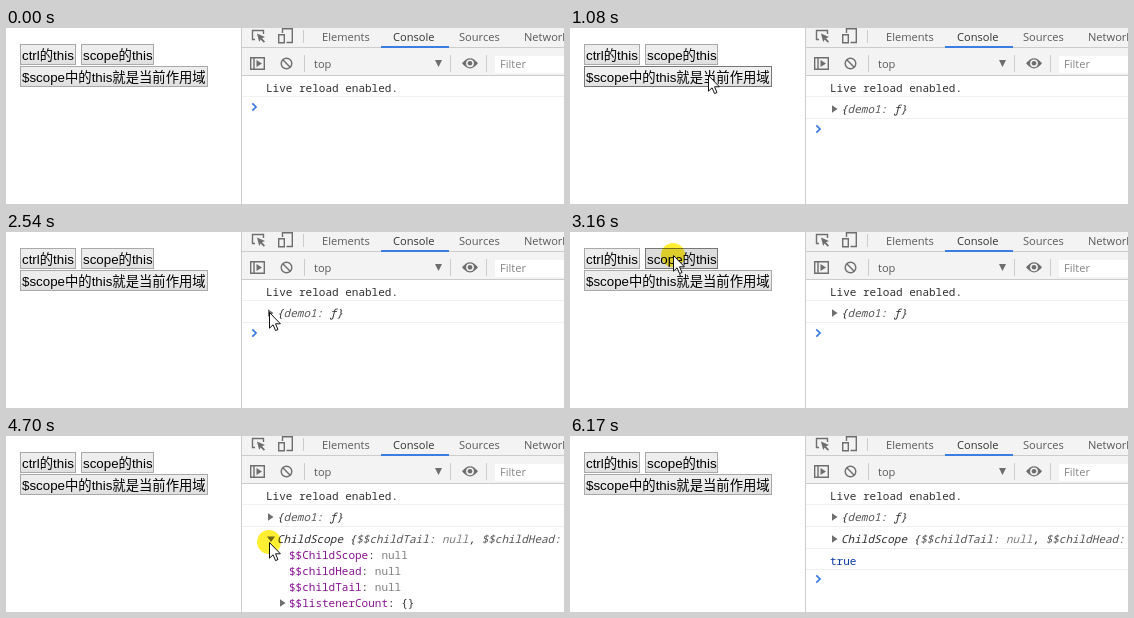
These frames come from a looping animation (558 px wide and 176 px high, 6.7 s). An HTML page:

```html
<!DOCTYPE html>
<html lang="zh">
<head>
<meta charset="utf-8">
<style>
html, body { margin: 0; width: 100%; height: 100%; overflow: hidden; background: #fff; }
svg { display: block; }
text { white-space: pre; }
.btn text { font: 13.333px "Liberation Sans", "Noto Sans CJK SC", "Noto Sans CJK", sans-serif; }
.btn rect { fill: url(#face); stroke: #a9a9a9; }
.btn.hover rect { fill: url(#faceHover); stroke: #777; }
.btn.down rect { fill: #dcdcdc; stroke: #777; }
.ui { font: 11.1px "Open Sans", sans-serif; fill: #5a5a5a; }
.log { font: 11px "Noto Sans Mono", monospace; fill: #303030; }
.pre { font-style: italic; }
.key { fill: #881391; }
.dim { fill: #565656; }
.nil { fill: #808080; }
.rule { stroke: #f0f0f0; }
.line { stroke: #ccc; }
.icon { fill: none; stroke: #6e6e6e; stroke-width: 1.4; }
.solid { fill: #6e6e6e; }
</style>
</head>
<body>
<svg width="558" height="176" viewBox="0 0 558 176">
  <defs>
    <linearGradient id="face" x2="0" y2="1"><stop offset=".38" stop-color="#ededed"/><stop offset="1" stop-color="#dedede"/></linearGradient>
    <linearGradient id="faceHover" x2="0" y2="1"><stop offset=".38" stop-color="#f0f0f0"/><stop offset="1" stop-color="#e0e0e0"/></linearGradient>
  </defs>
  <g id="buttons"></g>

  <rect x="235" width="323" height="47" fill="#f3f3f3"/>
  <path class="line" d="M235.5 0V176M236 19.5H558M236 47.5H558M297.5 2V15M298.5 27V44M444.5 27V44M480.5 27V44"/>
  <path d="M375 19H443" stroke="#3b7de0" stroke-width="2"/>
  <g class="ui">
    <text x="316" y="13">Elements</text>
    <text x="387" y="13" fill="#333">Console</text>
    <text x="453" y="13">Sources</text>
    <text x="518" y="13">Network</text>
    <text x="308" y="40">top</text>
  </g>
  <path class="icon" d="M249 11.5H246.5V2.5H257.5V6M276.5 5V.7H286.3V14.5H280.5M272.7 6.7H278.3V14.8H272.7Z"/>
  <path class="solid" d="M251 5.5L259 9L256 10.2L259 13.5L257.8 14.7L254.6 11.5L253.2 14ZM429 32H436L432.5 39Z"/>
  <path class="icon" d="M244.7 29.7H258.3V41.3H244.7ZM248 30V41"/>
  <path class="solid" d="M250.5 32L256 35.5L250.5 39Z"/>
  <circle class="icon" cx="280.5" cy="35.5" r="5.3"/>
  <path class="icon" d="M276.8 31.8L284.2 39.2"/>
  <path class="solid" d="M456 35.3Q464 25 472 35.3Q464 45.5 456 35.3Z"/>
  <circle cx="464" cy="35.3" r="3.9" fill="#f3f3f3"/>
  <circle class="solid" cx="464" cy="35.3" r="2.3"/>
  <rect x="489" y="28" width="69" height="17" fill="#fff"/>
  <text class="ui" x="494" y="40" style="fill:#858585">Filter</text>

  <g class="log">
    <text x="260" y="64">Live reload enabled.</text>
    <path class="rule" d="M236 68.5H558"/>
    <g id="demo">
      <path id="demoMark" class="solid"/>
      <text class="pre" x="271" y="85">{<tspan class="dim">demo1: </tspan>ƒ}</text>
      <path id="demoRule" class="rule" d="M236 90.5H558"/>
    </g>
    <g id="demoBody"></g>
    <g id="scope">
      <path id="scopeMark" class="solid"/>
      <text class="pre" x="271" y="107">ChildScope {<tspan class="dim">$$childTail: </tspan><tspan class="nil">null</tspan>, <tspan class="dim">$$childHead:</tspan></text>
      <path id="scopeRule" class="rule" d="M236 112.5H558"/>
    </g>
    <g id="scopeBody"></g>
    <g id="result">
      <text x="260" y="129" fill="#0d3aa9">true</text>
      <path class="rule" d="M236 133.5H558"/>
    </g>
  </g>
  <path id="prompt" d="M246.3 -3.6L250 0L246.3 3.6" fill="none" stroke="#3678e0" stroke-width="1.7"/>
  <circle id="ring" r="12" fill="#ffee32" style="mix-blend-mode:multiply"/>
  <path id="cursor" d="M.5 .5V16.2L4.1 12.8L6.6 18.6L9 17.5L6.5 11.8H11.4Z" fill="#fff" stroke="#111"/>
</svg>
<script>
const LOOP = 6700, TICKS = 87, ROW = 22, LINE = 16;
const $ = id => document.getElementById(id);

const buttons = [
  { x: 14, y: 16, w: 56, h: 21, label: 'ctrl的this' },
  { x: 75, y: 16, w: 73, h: 21, label: 'scope的this' },
  { x: 14, y: 38, w: 188, h: 21, label: '$scope中的this就是当前作用域' }
];
$('buttons').innerHTML = buttons.map(b => `<g class="btn">
  <rect x="${b.x + .5}" y="${b.y + .5}" width="${b.w - 1}" height="${b.h - 1}"/>
  <text x="${b.x + 2}" y="${b.y + 16}">${b.label}</text></g>`).join('');
const faces = document.querySelectorAll('.btn');

const closedMark = (x, y) => `M${x} ${y - 3.7}l5.5 3.7l-5.5 3.7Z`;
const openMark = (x, y) => `M${x - 1} ${y - 2.5}h8l-4 5.5Z`;

function fillBody(id, top, list) {
  $(id).innerHTML = list.map(({ key, value, more }, i) => {
    const y = top + LINE * i;
    const mark = more ? `<path class="solid" d="${closedMark(274, y)}"/>` : '';
    const kind = value === 'null' ? 'nil' : '';
    return `${mark}<text x="283" y="${y + 4}"><tspan class="key">${key}</tspan>: <tspan class="${kind}">${value}</tspan></text>`;
  }).join('');
}
fillBody('demoBody', 97, [
  { key: 'demo1', value: 'ƒ ()', more: true },
  { key: '__proto__', value: 'Object', more: true }
]);
fillBody('scopeBody', 119, [
  ...['ChildScope', 'childHead', 'childTail'].map(name => ({ key: '$$' + name, value: 'null' })),
  { key: '$$listenerCount', value: '{}', more: true }
]);

// Each click is pressed at one tick and takes effect at a later one.
const clicks = {
  log: { press: 11, effect: 12 },
  open: { press: 21, effect: 22 },
  fold: { press: 30, effect: 31 },
  logScope: { press: 41, effect: 42 },
  openScope: { press: 52, effect: 53 },
  foldScope: { press: 61, effect: 63 },
  logTrue: { press: 73, effect: 74 }
};

const enter = { tick: 2, x: 198, y: 111 }, exitTick = 80;
const moves = [
  { from: 2, to: 9, x: 48, y: 22 },
  { from: 12, to: 19, x: 263, y: 81 },
  { from: 23, to: 26, x: 284, y: 104 },
  { from: 27, to: 30, x: 266, y: 83 },
  { from: 32, to: 33, x: 263, y: 80 },
  { from: 33, to: 38, x: 103, y: 23 },
  { from: 42, to: 49, x: 271, y: 114 },
  { from: 49, to: 51, x: 264, y: 102 },
  { from: 53, to: 56, x: 267, y: 110 },
  { from: 57, to: 60, x: 263, y: 106 },
  { from: 64, to: 70, x: 97, y: 50 },
  { from: 77, to: 79, x: 213, y: 142 }
];
const easeOut = k => 1 - (1 - Math.min(1, Math.max(0, k))) ** 1.6;

function pointerAt(n) {
  let { x, y } = enter;
  for (const m of moves) {
    const k = easeOut((n - m.from) / (m.to - m.from));
    x += (m.x - x) * k;
    y += (m.y - y) * k;
  }
  return { x: Math.round(x), y: Math.round(y) };
}

const show = (id, on) => { $(id).style.display = on ? '' : 'none'; };
const move = (id, x, y) => $(id).setAttribute('transform', `translate(${x} ${y})`);
const setMark = (id, open, y) => $(id).setAttribute('d', (open ? openMark : closedMark)(262, y));

function draw(n) {
  const did = name => n >= clicks[name].effect;
  const pressed = Object.values(clicks).some(c => n >= c.press && n < c.effect);
  const demoOpen = did('open') && !did('fold');
  const scopeOpen = did('openScope') && !did('foldScope');
  const bodyLines = 2 * demoOpen + 10 * scopeOpen;

  show('demo', did('log'));
  show('demoBody', demoOpen);
  show('scope', did('logScope'));
  show('scopeBody', scopeOpen);
  show('scopeRule', !scopeOpen);
  show('result', did('logTrue'));
  setMark('demoMark', demoOpen, 81);
  setMark('scopeMark', scopeOpen, 103);
  move('demoRule', 0, demoOpen ? 2 * LINE : 0);
  move('prompt', 0, 79 + ROW * (did('log') + did('logScope')) + LINE * bodyLines + 20 * did('logTrue'));

  const inside = n >= enter.tick && n < exitTick;
  const tip = pointerAt(n);
  show('cursor', inside);
  show('ring', pressed);
  move('cursor', tip.x, tip.y);
  move('ring', tip.x, tip.y);
  buttons.forEach((b, i) => {
    const over = inside && tip.x >= b.x && tip.x < b.x + b.w && tip.y >= b.y && tip.y < b.y + b.h;
    faces[i].setAttribute('class', 'btn' + (over ? pressed ? ' down' : ' hover' : ''));
  });
}

const start = performance.now();
function frame() {
  const time = Math.max(0, performance.now() - start) % LOOP;
  draw(Math.min(TICKS - 1, Math.floor(time / LOOP * TICKS + .1)));
  requestAnimationFrame(frame);
}
frame();
</script>
</body>
</html>
```
